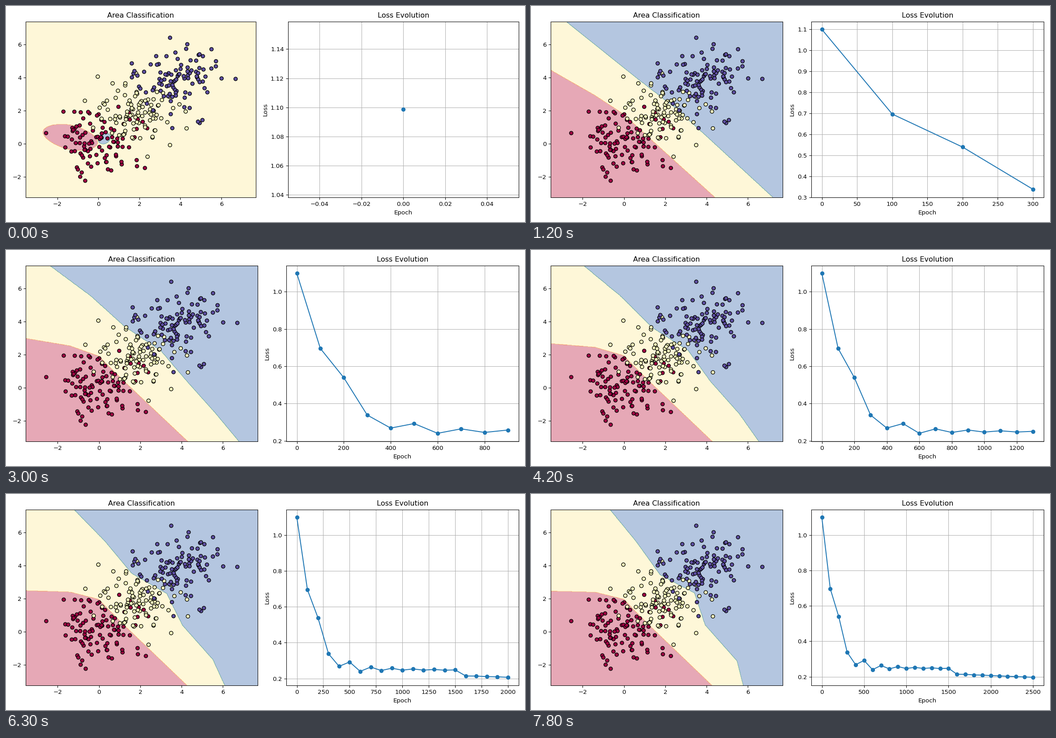
Animation, 1159 px wide and 483 px high, one loop 8 s. Source, as a matplotlib script:

```python
import numpy as np
import matplotlib.pyplot as plt
from matplotlib.animation import FuncAnimation

DPI = 96.6
TICK = 100          # ms per animation frame
HOLD = 3            # animation frames per training snapshot
FRAMES = 80
LAST = 26

# Three Gaussian clusters
labels = np.repeat([0, 1, 2], 100)
pts = np.random.RandomState(0).randn(300, 2) + 2 * labels[:, None]

lo, hi = pts.min(axis=0) - 1, pts.max(axis=0) + 1
gx, gy = np.meshgrid(np.arange(lo[0], hi[0], 0.02), np.arange(lo[1], hi[1], 0.02))

# Loss: steep descent, slow plateau and a damped zigzag
snaps = np.arange(LAST)
losses = np.interp(snaps, [0, 1, 2, 3, 4, 6, 15, 16, 25],
                   [1.0986, .696, .539, .338, .293, .254, .247, .215, .197])
losses -= np.where(snaps < 4, 0, .025 * (-.75) ** (snaps - 4.0).astype(int).clip(0))

# Settled red boundary, and the bends of the blue one as it folds
RED_X = np.array([-3.6, -1.4, 0, .38, 1.2, 5])
RED_Y = np.array([2.45, 2.4, 1.97, 1.46, .43, -4.12])

line_x = np.linspace(-3.2, 6.8, 7)
BLUE = {
    2: np.column_stack([line_x, 4 - 1.061 * line_x]),
    6: np.array([(-2.42, 7.41), (-.5, 5.58), (1.24, 3.96), (3.24, 2.19),
                 (4.49, .65), (6, -1.23), (7.6, -3.22)]),
    10: np.array([(-2.4, 7.41), (-.4, 5.56), (1.24, 3.71), (3, 2.24),
                  (4.28, .37), (5.6, -1.47), (6.77, -3.22)]),
    26: np.array([(-.69, 7.41), (.59, 5.46), (1.75, 3.45), (3.41, 2.35),
                  (3.93, .42), (5.47, -1.75), (5.77, -3.22)]),
}


def red_edge(step):
    """A straight line relaxing exponentially to its settled shape."""
    left = np.exp((2 - step) / 4.6)
    return RED_X, left * (1.68 - 1.093 * RED_X) + (1 - left) * RED_Y


def blue_edge(step):
    keys = list(BLUE)
    i = min(np.searchsorted(keys, step, side="right"), len(keys) - 1)
    a, b = keys[i - 1], keys[i]
    w = (step - a) / (b - a)
    return ((1 - w) * BLUE[a] + w * BLUE[b]).T


def above(x, y):
    """Mask of grid points up and to the right of a falling curve."""
    return gx + gy > np.interp(gx - gy, x - y, x + y)


def blob(cx, cy, rx, ry, shear):
    dx = gx - cx
    dy = gy - cy - shear * dx
    return np.abs(dx / rx) ** 1.7 + (dy / ry) ** 2 < 1


def classify(step):
    if step < 2:
        return 1.0 - blob(-1.37, .4, 1.33, .75, -.23) + blob(.3, .32, .3, .32, .3)
    return 1.0 * above(*red_edge(step)) + above(*blue_edge(step))


fig, (area, loss) = plt.subplots(1, 2, figsize=(1159 / DPI, 5), dpi=DPI)
shown = None


def update(frame):
    global shown
    step = min(frame // HOLD, LAST)
    if step == shown:
        return
    shown = step

    area.clear()
    area.contourf(gx, gy, classify(step), cmap="Spectral", alpha=0.4)
    area.scatter(*pts.T, c=labels, cmap="Spectral", edgecolors="k")
    area.set_title("Area Classification")

    count = max(step, 1)
    loss.clear()
    loss.plot(100 * snaps[:count], losses[:count], marker="o")
    loss.set_title("Loss Evolution")
    loss.set_xlabel("Epoch")
    loss.set_ylabel("Loss")
    loss.grid(True)
    fig.tight_layout()


anim = FuncAnimation(fig, update, frames=FRAMES, interval=TICK, repeat=True,
                     cache_frame_data=False)
plt.show()
```
